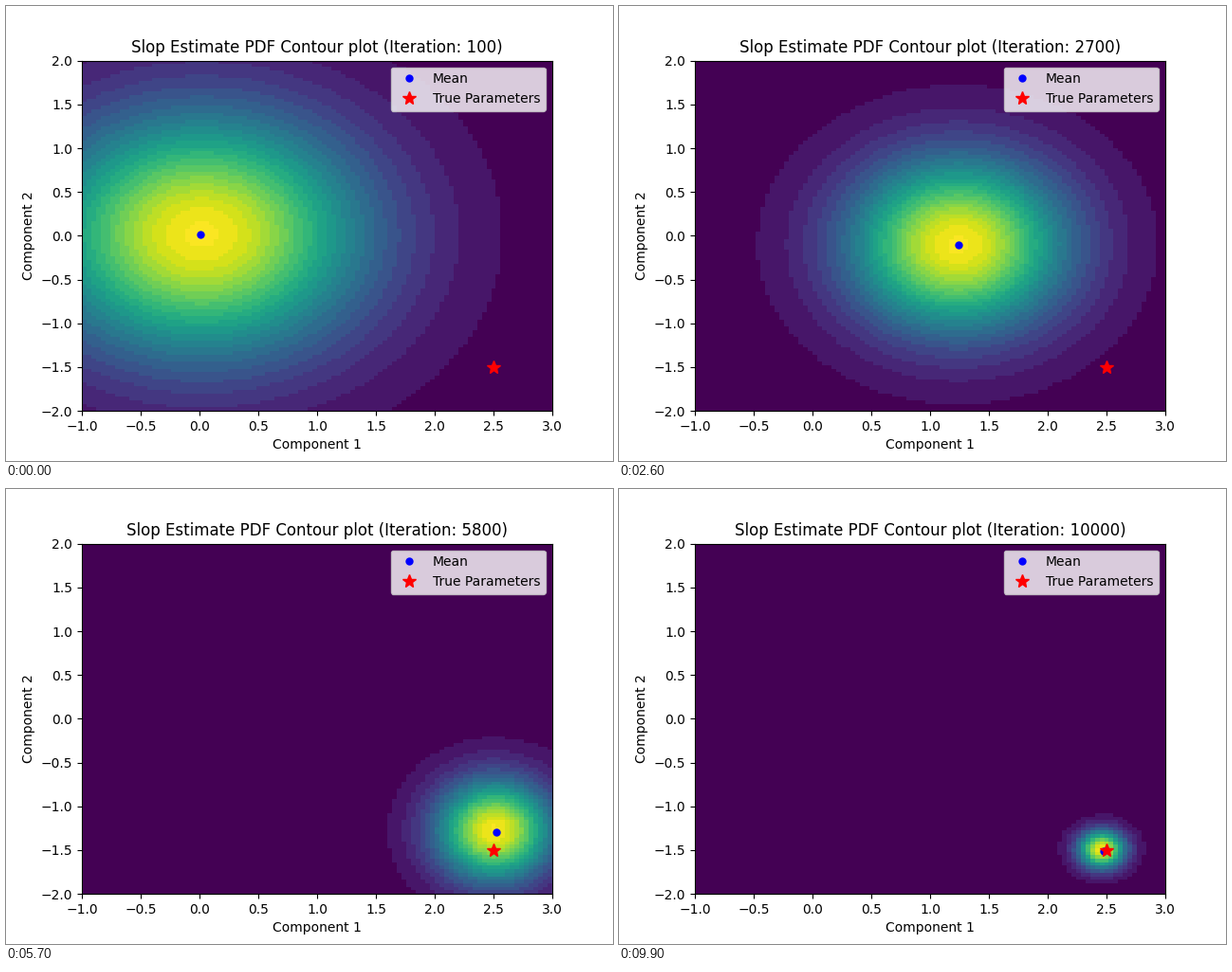
Write a matplotlib script that moves like this. It is 640x480 px and loops after 10 s.

```python
import numpy as np
import matplotlib.pyplot as plt
from matplotlib.animation import FuncAnimation
from matplotlib.colors import BoundaryNorm, ListedColormap

FRAMES = 100
STEP = 100
BANDS = 22

plt.rcParams["font.family"] = "DejaVu Sans"

xs, ys = np.meshgrid(np.linspace(-1, 3, 100), np.linspace(-2, 2, 100))


def sigmoid(i, centre, width):
    return 1 / (1 + np.exp(-(i - centre) / width))


def settle(i, tau):
    return 1 - np.exp(-i / tau)


def estimate(i):
    """Mean and spread: a quick first jump, then convergence on the truth."""
    pull = np.clip((i - 12) / 39, 0, 1) ** 2
    wobble = 0.033 * np.cos(np.pi * (i - 67) / 32)
    dip = 0.18 * np.exp(-((i - 26) / 10) ** 2)
    mx = 0.008 + 1.05 * settle(i, 4.5) + (1.45 + wobble) * pull
    my = 0.016 + 0.19 * settle(i, 4.5) - 1.715 * sigmoid(i, 43.5, 7) - dip
    sx = 0.69 - 0.55 * sigmoid(i, 53, 9) + 0.31 * np.exp(-i / 4)
    sy = 0.74 - 0.59 * sigmoid(i, 55, 10) + 0.26 * np.exp(-i / 5)
    return mx, my, sx, sy


def density(mx, my, sx, sy):
    z = np.exp(-0.5 * (((xs - mx) / sx) ** 2 + ((ys - my) / sy) ** 2))
    return z / z.max()


def banded_viridis():
    # Bands get slightly narrower toward the peak.
    t = np.linspace(0, 1, BANDS + 1)
    levels = np.concatenate([[0], 0.035 + 0.955 * t * (1.18 - 0.18 * t), [1]])
    mids = (levels[:-1] + levels[1:]) / 2
    mids[0] = 0.003
    cmap = ListedColormap(plt.get_cmap("viridis")(mids))
    return cmap, BoundaryNorm(levels, len(mids))


fig, ax = plt.subplots(figsize=(6.4, 4.8), dpi=100)
cmap, norm = banded_viridis()
image = ax.imshow(density(*estimate(0)), extent=(-1, 3, -2, 2), origin="lower",
                  aspect="auto", interpolation="nearest", cmap=cmap, norm=norm)
mean, = ax.plot([0], [0], "bo", markersize=5, label="Mean")
ax.plot([2.5], [-1.5], "r*", markersize=10, label="True Parameters")
ax.set(xlim=(-1, 3), ylim=(-2, 2), xlabel="Component 1", ylabel="Component 2")
ax.legend(loc="upper right")
title = ax.set_title("")


def update(i):
    mx, my, sx, sy = estimate(i)
    image.set_data(density(mx, my, sx, sy))
    mean.set_data([mx], [my])
    title.set_text(f"Slop Estimate PDF Contour plot (Iteration: {(i + 1) * 100})")
    return image, mean, title


anim = FuncAnimation(fig, update, frames=FRAMES, interval=STEP, repeat=True,
                     repeat_delay=0, blit=False)
plt.show()
```
